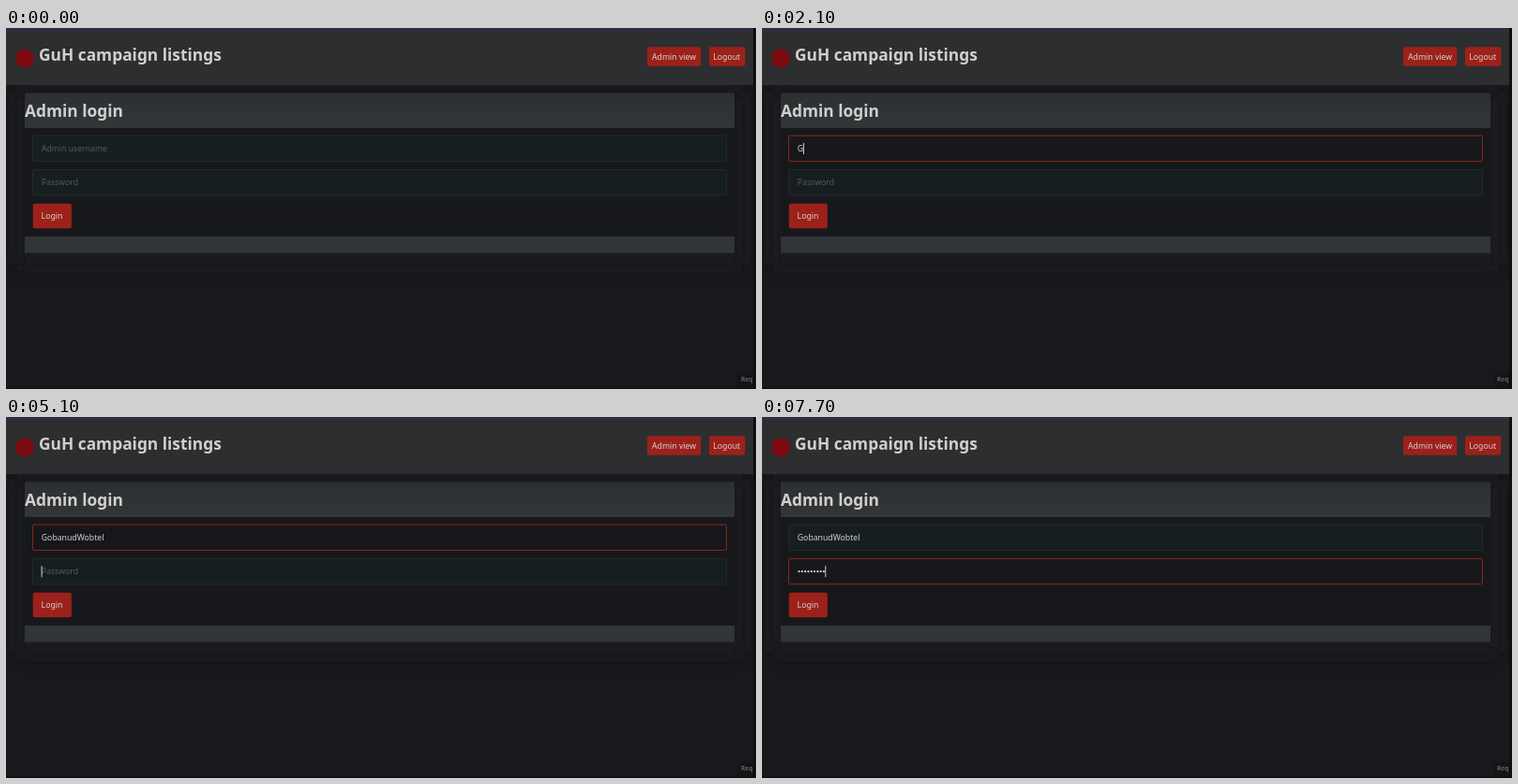
An HTML page that plays this animation: 800x386 px, repeating every 8 s.

```html
<!DOCTYPE html>
<html lang="en">
<head>
<meta charset="utf-8">
<title>Admin login</title>
<style>
  html, body { margin: 0; width: 100%; height: 100%; overflow: hidden; background: #18191c; }
  svg { display: block; font: 8.7px "Noto Sans", sans-serif; fill: #d4d2ce; }
  .heading { font-size: 17.35px; font-weight: 700; fill: #d2d0cc; }
  .button { fill: #9c211b; }
  .field { fill: #171e20; stroke: #222a2c; }
  .dark { fill: #17181b; }
  .ring { fill: none; stroke: #86261f; }
  .hint { fill: #55595a; }
  .caret { fill: #cfcdc9; }
</style>
</head>
<body>
<svg width="800" height="386" viewBox="0 0 800 386">
  <defs>
    <linearGradient id="band" x2="0" y2="1">
      <stop stop-color="#2d3032"/><stop offset="1" stop-color="#323639"/>
    </linearGradient>
    <filter id="soft" x="-10%" y="-30%" width="120%" height="160%"><feGaussianBlur stdDeviation="10"/></filter>
  </defs>

  <rect width="800" height="386" fill="#18191c"/>
  <rect x="12" y="68" width="773" height="184" fill="#1c1e20" opacity=".8" filter="url(#soft)"/>
  <rect width="797" height="61" fill="#2d2e30"/>
  <rect width="797" height="4" fill="#2f2e41"/>
  <circle cx="20" cy="32.5" r="10" fill="#7d0b10"/>
  <text class="heading" x="35" y="34.7">GuH campaign listings</text>
  <rect class="button" x="684" y="20.3" width="57.2" height="20.4" rx="2"/>
  <text x="689" y="33.5">Admin view</text>
  <rect class="button" x="750" y="20.3" width="38.4" height="20.4" rx="2"/>
  <text x="754.3" y="33.5">Logout</text>

  <rect x="20" y="69.7" width="757" height="37.3" fill="url(#band)"/>
  <rect x="20" y="107" width="757" height="116" fill="#17181b"/>
  <rect x="20" y="223" width="757" height="17.5" fill="#323538"/>
  <text class="heading" x="20" y="94.5">Admin login</text>
  <g id="user"></g>
  <g id="pass" transform="translate(0 36.2)"></g>
  <rect class="button" x="28.7" y="187.7" width="41.2" height="26.6" rx="2"/>
  <text x="37.6" y="204">Login</text>

  <rect x="780" y="369" width="17" height="15" fill="#141517"/>
  <text x="784" y="378" font-size="6.6" font-weight="600" style="fill:#606264">Req</text>
  <rect x="797" width="3" height="386" fill="#0d0e10"/>
  <rect y="384.5" width="800" height="1.5" fill="#0d0e10"/>

  <g id="pointer">
    <path id="arrow" d="M0 0V9.5L2.3 7.5 3.8 10.8 5.3 10.1 3.9 7H6.8Z" fill="#111" stroke="#d8d8d8" stroke-width=".8"/>
    <path id="beam" d="M-1.7-3.2H1.7M0-3.2V3.2M-1.7 3.2H1.7" fill="none" stroke="#bfc0c0"/>
  </g>
</svg>
<script>
const $ = id => document.getElementById(id);
const LOOP = 8000, NAME = "GobanudWobtel";
const nameKeys = [1900, 2400, 2600, 2700, 2900, 3000, 3100, 3400, 3600, 3700, 4300, 4500, 4600];
const passKeys = [5700, 6100, 6200, 6300, 7000, 7100, 7300, 7500, 7700];

function makeField(id, hint) {
  const box = cls => `<rect class="${cls}" x="28.5" y="115.2" width="740" height="27.3" rx="1.5"/>`;
  const g = $(id);
  g.innerHTML = box("field") + box("dark") + box("ring") +
    `<text class="hint" x="37.8" y="132">${hint}</text><text class="value" x="37.8" y="132"></text>
     <g class="dots"></g><rect class="caret" y="123" width="1" height="12"/>`;
  return name => g.querySelector("." + name);
}

const user = makeField("user", "Admin username");
const pass = makeField("pass", "Password");
pass("dots").innerHTML = passKeys.map((_, i) => `<circle cx="${39.5 + 3.3 * i}" cy="129" r="1.1"/>`).join("");

const ramp = (t, from, to) => Math.min(1, Math.max(0, (t - from) / (to - from)));
const typed = (keys, t) => keys.filter(k => t >= k).length;
const show = (el, on) => el.setAttribute("visibility", on ? "visible" : "hidden");

function paintField(part, count, focused, ring, dark, caretX) {
  part("ring").setAttribute("opacity", ring);
  part("dark").setAttribute("opacity", dark);
  show(part("hint"), !count);
  show(part("caret"), focused);
  part("caret").setAttribute("x", caretX);
}

function draw(t) {
  const letters = typed(nameKeys, t), dots = typed(passKeys, t);
  const focus = ramp(t, 1000, 1400), swap = ramp(t, 5100, 5400);

  user("value").textContent = NAME.slice(0, letters);
  const nameEnd = 37.6 + (letters ? user("value").getComputedTextLength() : 0);
  const userGlow = focus * (1 - swap);
  paintField(user, letters, t >= 1000 && t < 4900, userGlow, userGlow, nameEnd);

  [...pass("dots").children].forEach((dot, i) => show(dot, i < dots));
  paintField(pass, dots, t >= 4900, swap, swap, 37.6 + 3.3 * dots);

  const move = ramp(t, 100, 900), ease = move * move * (3 - 2 * move);
  const x = 166 - 37 * ease, y = 327 - 194 * ease;
  const overField = y < 142 || (y > 151 && y < 179);
  $("pointer").setAttribute("transform", `translate(${x} ${y})`);
  const moving = t >= 100 && t < 1900;
  show($("arrow"), moving && !overField);
  show($("beam"), moving && overField);
}

function tick() {
  draw(performance.now() % LOOP);
  requestAnimationFrame(tick);
}
tick();
</script>
</body>
</html>
```
